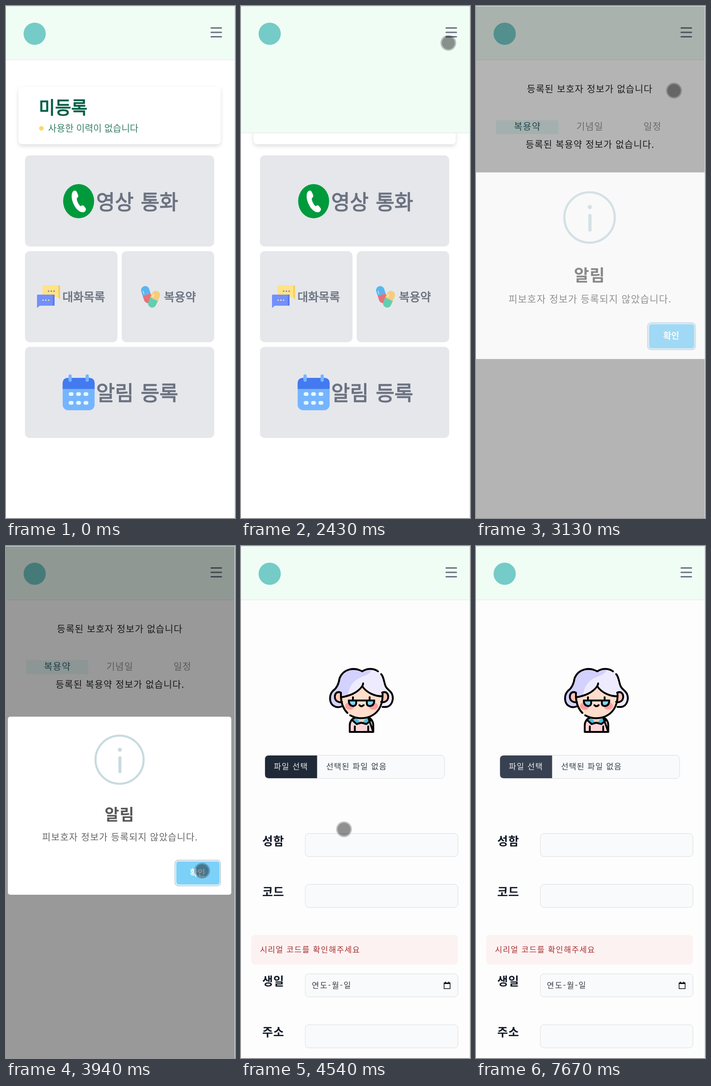
These frames come from a looping animation (495 px wide and 1107 px high, 8 s). An HTML page:

```html
<!DOCTYPE html>
<html lang="ko">
<head>
<meta charset="utf-8">
<title>보호 정보 등록</title>
<style>
html, body { margin: 0; width: 100%; height: 100%; overflow: hidden; background: #fff; }
svg { display: block; width: 495px; height: 1107px; }
text { font-family: "Noto Sans CJK KR", "Noto Sans CJK", "Noto Sans", sans-serif; white-space: pre; }
.tile { fill: #e5e7eb; }
.medium { stroke-linejoin: round; stroke-width: 1.3px; }
.big { font-size: 44px; fill: #6b7280; stroke: #6b7280; word-spacing: 3px; }
.small { font-size: 25px; fill: #6b7280; stroke: #6b7280; stroke-width: .8px; }
.info { font-size: 20px; font-weight: 300; letter-spacing: 1px; text-anchor: middle; fill-opacity: .85; }
.label { font-size: 25px; font-weight: 700; fill: #111827; letter-spacing: .8px; }
.field { font-size: 17px; font-weight: 300; letter-spacing: 1.4px; fill: #1f2937; fill-opacity: .9; }
.input { fill: #f9fafb; stroke: #d9dcdf; }
.ink { fill: none; stroke: #000; stroke-width: 4; stroke-linecap: round; stroke-linejoin: round; }
.card { filter: drop-shadow(0 4px 4px rgba(0,0,0,.13)); }
</style>
</head>
<body>
<svg viewBox="0 0 495 1107" xmlns="http://www.w3.org/2000/svg">
  <rect width="495" height="1107" fill="#fff"/>

  <g id="home">
    <rect class="card" x="27" y="175" width="437" height="124" rx="8" fill="#fff"/>
    <text class="medium" x="71" y="233" font-size="38" fill="#065f46" stroke="#065f46">미등록</text>
    <circle cx="76.500" cy="264.500" r="5" fill="#fcd96a"/>
    <text x="91" y="272" font-size="20" font-weight="300" fill="#065f46" fill-opacity=".8">사용한 이력이 없습니다</text>

    <rect class="tile" x="41" y="323" width="409" height="197" rx="10"/>
    <rect class="tile" x="41" y="530" width="200" height="197" rx="10"/>
    <rect class="tile" x="250" y="530" width="200" height="197" rx="10"/>
    <rect class="tile" x="41" y="737" width="409" height="197" rx="10"/>

    <ellipse cx="157" cy="422" rx="33.500" ry="37" fill="#009a3d"/>
    <path fill="#fff" d="M144 402C147 398 151 398 153 402L156 409C157 412 155 414 153 416C153 422 157 429 161 433C164 431 166 430 168 432L172 437C174 440 172 444 168 446C160 447 152 440 147 430C142 420 140 409 144 402Z"/>
    <text class="medium big" x="195" y="440">영상 통화</text>

    <path fill="#ffe386" d="M81 604H115Q117 604 117 606V634L111 629H79V606Q79 604 81 604Z"/>
    <path fill="#f6cf62" d="M113 604H115Q117 604 117 606V634L113 630Z"/>
    <path fill="#7390fa" d="M69 624H103Q105 624 105 626V646Q105 648 103 648H73L67 653V626Q67 624 69 624Z"/>
    <path fill="#5a7af0" d="M101 624H103Q105 624 105 626V646Q105 648 103 648H101Z"/>
    <g fill="#6b6ccb"><circle cx="92" cy="616.500" r="1.500"/><circle cx="98" cy="616.500" r="1.500"/><circle cx="104" cy="616.500" r="1.500"/></g>
    <g fill="#ffe9c0"><circle cx="80" cy="636" r="1.500"/><circle cx="86" cy="636" r="1.500"/><circle cx="92" cy="636" r="1.500"/></g>
    <text class="small" x="122" y="638">대화목록</text>

    <g transform="translate(304 624) rotate(-18)">
      <path fill="#5ab5ee" d="M-9 0V-10A9 9 0 0 1 9 -10V0Z"/>
      <path fill="#e5737b" d="M-9 0V10A9 9 0 0 0 9 10V0Z"/>
      <path fill="none" stroke="#b5e0fa" stroke-width="2" d="M-5 -3V-10"/>
    </g>
    <g transform="translate(320 634) rotate(24)">
      <path fill="#f6cd7b" d="M-9 0V-10A9 9 0 0 1 9 -10V0Z"/>
      <path fill="#62ceb0" d="M-9 0V10A9 9 0 0 0 9 10V0Z"/>
      <path fill="none" stroke="#fff0c8" stroke-width="2" d="M-5 -3V-10"/>
    </g>
    <text class="small" x="341.500" y="638">복용약</text>

    <rect x="122.500" y="804" width="69" height="70" rx="12" fill="#75b5ff"/>
    <path fill="#447af0" d="M122.500 828V816Q122.500 804 134.500 804H179.500Q191.500 804 191.500 816V828Z"/>
    <path stroke="#75b5ff" stroke-width="7" stroke-linecap="round" d="M138.500 800V809M175.500 800V809"/>
    <path stroke="#e8f6fd" stroke-width="8" stroke-linecap="round" d="M139.500 839H142M155.500 839H158M171.500 839H174M139.500 858H142M155.500 858H158M171.500 858H174"/>
    <text class="medium big" x="195" y="853">알림 등록</text>
  </g>

  <g id="guard">
    <text class="info" x="246" y="187">등록된 보호자 정보가 없습니다</text>
    <rect x="43" y="247" width="135" height="30" fill="#e9faf7"/>
    <text class="info" x="111" y="268" fill="#134e5a">복용약</text>
    <text class="info" x="246" y="268" fill="#848484">기념일</text>
    <text class="info" x="381.500" y="268" fill="#848484">일정</text>
    <text class="info" x="246.500" y="307">등록된 복용약 정보가 없습니다.</text>
  </g>

  <g id="form">
    <rect y="117" width="494" height="990" fill="#fdfdfd"/>
    <path fill="#fdd5d8" d="M235 402V388C235 380 240 373 247 371H275C282 373 286 380 286 388V402Z"/>
    <path fill="#45bfdc" d="M240 377L250 386L260 384L271 386L282 377L274 370H247Z"/>
    <path fill="#ffcdbd" d="M249 371H272L260 384Z"/>
    <path class="ink" d="M235 402V388C235 380 240 373 247 371M275 371C282 373 286 380 286 388V402ZM235 402H286M246 390V401M275 390V401M241 377L250 385L260 382L271 385L281 377"/>
    <path fill="#efebff" d="M262 271C274 263 288 265 297 271C309 281 309 296 313 304C316 310 322 312 326 319C331 330 327 346 314 348H217C212 349 206 349 201 346C190 340 190 322 199 313C206 308 211 300 213 286C222 264 246 262 262 271Z"/>
    <path fill="#d3d1fd" d="M282 267C278 288 238 274 231 324L217 347C212 349 206 349 201 346C190 340 190 322 199 313C206 308 211 300 213 286C222 264 246 262 262 271Q272 265 282 267Z"/>
    <path fill="#ffc4b5" d="M216 317C206 313 202 321 203 328C204 336 212 339 218 337ZM305 317C315 313 319 321 318 328C317 336 309 339 303 337Z"/>
    <path fill="#ffdccb" d="M216 327C232 325 252 318 262 303C272 318 290 325 306 325C306 352 286 373 261 373C236 373 216 352 216 327Z"/>
    <ellipse cx="235" cy="346" rx="10" ry="8" fill="#ff9f9d"/>
    <ellipse cx="286" cy="346" rx="10" ry="8" fill="#ff9f9d"/>
    <path class="ink" d="M262 271C246 262 222 264 213 286C211 300 206 308 199 313C190 322 190 340 201 346C206 349 212 349 217 347M262 271C274 263 288 265 296 271M303 277C309 283 309 296 313 304C316 310 322 312 326 319C331 330 327 346 314 348H306"/>
    <path class="ink" d="M216 317C206 313 202 321 203 328C204 336 212 339 218 337M305 317C315 313 319 321 318 328C317 336 309 339 303 337"/>
    <path class="ink" d="M216 318V327C217 342 222 353 230 361M236 366C262 381 305 370 306 325V318M216 327C232 325 252 318 262 303Q264 300 264 297M262 303C272 318 290 325 306 325"/>
    <path class="ink" style="fill:#7fd6fa" d="M233 334H249V340Q248 346 242 346Q233 345 233 334ZM272 334H288Q288 345 279 346Q272 346 272 340Z"/>
    <path class="ink" d="M233 334H288M242 327V331M278 327V331M256 344Q260 349 265 344"/>

    <rect class="input" x="51.500" y="452.500" width="388.500" height="50" rx="8"/>
    <path id="pick" d="M164.500 453V502H60Q52 502 52 494V461Q52 453 60 453Z"/>
    <text class="field" x="71" y="483" style="fill:#fff">파일 선택</text>
    <text class="field" x="184" y="483">선택된 파일 없음</text>

    <text class="label" x="46" y="647">성함</text>
    <text class="label" x="46" y="757">코드</text>
    <text class="label" x="46" y="950">생일</text>
    <text class="label" x="46" y="1060">주소</text>
    <rect class="input" x="139" y="621.500" width="330" height="50" rx="8"/>
    <rect class="input" x="139" y="731.500" width="330" height="50" rx="8"/>
    <rect class="input" x="139" y="925" width="330" height="50" rx="8"/>
    <rect class="input" x="139" y="1035" width="330" height="50" rx="8"/>
    <rect x="22" y="841" width="447" height="64" rx="8" fill="#fdf2f2"/>
    <text class="field" x="41" y="879" style="fill:#9b1c1c">시리얼 코드를 확인해주세요</text>
    <text class="field" x="153" y="956" style="letter-spacing:2px">연도-월-일</text>
    <path fill="none" stroke="#111" stroke-width="1.500" d="M439 944.500H452V957H439Z"/>
    <path stroke="#111" stroke-width="3" d="M439 945.500H452"/>
    <path stroke="#111" stroke-width="2" d="M442 942V945M449 942V945"/>
  </g>

  <g>
    <rect id="head" width="494" height="116" fill="#f0fdf5"/>
    <rect id="rule" y="116" width="494" height="1" fill="#e1e8e6"/>
    <circle cx="62" cy="60" r="24" fill="#74cbc8"/>
    <path stroke="#6b7280" stroke-width="3" stroke-linecap="round" d="M443.500 47.500H465.500M443.500 57H465.500M443.500 66.500H465.500"/>
  </g>

  <g id="alert">
    <rect y="1" width="494" height="1106" opacity=".4"/>
    <g id="box">
      <rect x="4" y="369" width="483" height="385" rx="5" fill="#fff"/>
      <circle cx="245.500" cy="462" r="52" fill="none" stroke="#c9dae1" stroke-width="4.500"/>
      <circle cx="246" cy="440.500" r="4.300" fill="#c9dae1"/>
      <rect x="243" y="455" width="6.500" height="36" rx="2" fill="#c9dae1"/>
      <text x="245.500" y="593" font-size="34" font-weight="700" fill="#595959" text-anchor="middle" letter-spacing="1">알림</text>
      <text class="info" x="246.500" y="637" fill="#4c4c4c">피보호자 정보가 등록되지 않았습니다.</text>
      <rect x="365.500" y="679.500" width="98" height="55" rx="7" fill="#fff" stroke="#c3d6e4" stroke-width="2.500"/>
      <rect x="368" y="682" width="93.500" height="50" rx="5" fill="#7cd1f9"/>
      <text x="414" y="712.500" font-size="18" font-weight="700" fill="#fff" text-anchor="middle">확인</text>
    </g>
  </g>

  <path fill="#d9dfe1" d="M0 0H495V1H0ZM494 1H495V1107H494Z"/>
  <g id="touch"><circle r="17" fill-opacity=".24"/><circle r="14" fill-opacity=".25"/></g>
  <path id="arrow" fill="#fff" stroke="#000" d="M493.500 124.500V147.500L499 142L503 150L506 148L502 141H509Z"/>
</svg>
<script>
const LOOP = 8000;
const $ = id => document.getElementById(id);
const [home, guard, form, head, rule, pick, modal, box, touch, arrow] =
  ['home', 'guard', 'form', 'head', 'rule', 'pick', 'alert', 'box', 'touch', 'arrow'].map($);

const clamp = v => Math.max(0, Math.min(1, v));
const easeOut = p => 1 - (1 - clamp(p)) ** 2.2;
const smooth = p => p * p * (3 - 2 * p);
const linear = p => p;
const show = (el, on) => el.style.display = on ? '' : 'none';

// time, x, y, easing into the point
const path = [
  [1480, 484, 118, linear], [1900, 454, 50, smooth], [2290, 454, 50, linear],
  [2750, 428, 183, smooth], [3450, 428, 183, linear], [3920, 424, 702, smooth],
  [4340, 424, 702, linear], [4540, 223, 613, linear], [5100, 141, 480, easeOut]
];
// progress, scale, easing
const pop = [[0, .5, easeOut], [.45, 1.05, easeOut], [.8, .95, easeOut], [1, 1, easeOut]];

function at(keys, t, col) {
  const i = keys.findIndex(k => k[0] > t);
  if (i < 0) return keys[keys.length - 1][col];
  if (i === 0) return keys[0][col];
  const a = keys[i - 1], b = keys[i];
  const ease = b[b.length - 1];
  return a[col] + (b[col] - a[col]) * ease((t - a[0]) / (b[0] - a[0]));
}

function pointer(t) {
  if (t >= 70 && t < 140) return [490, 1102, 1];
  if (t >= 1480 && t < 5880) return [at(path, t, 1), at(path, t, 2), 1 - .3 * clamp((t - 5520) / 360)];
  if (t >= 6150 && t < 7610) return [121, 490, 1];
  return null;
}

function draw(t) {
  show(home, t < 2830);
  show(guard, t >= 2830 && t < 4080);
  show(form, t >= 4080);

  const bottom = t >= 2000 && t < 2830 ? 274 : 116;
  head.setAttribute('height', bottom);
  rule.setAttribute('y', bottom);

  const age = t - 2995;
  const fade = 1 - easeOut((t - 3945) / 265);
  show(modal, age > 0 && t < 4210);
  modal.setAttribute('opacity', easeOut(age / 300) * fade);
  box.setAttribute('opacity', easeOut(age / 200) * fade);
  box.setAttribute('transform',
    `translate(245.5 561.5) scale(${at(pop, age / 300, 1)}) translate(-245.5 -561.5)`);

  const p = pointer(t);
  show(touch, p);
  if (p) touch.setAttribute('transform', `translate(${p[0]} ${p[1]}) scale(${p[2]})`);
  show(arrow, t >= 1405 && t < 1480);
  pick.setAttribute('fill', t > 4700 ? '#374151' : '#1f2937');
}

const start = performance.now();
function tick() {
  draw((performance.now() - start) % LOOP);
  requestAnimationFrame(tick);
}
draw(0);
requestAnimationFrame(tick);
</script>
</body>
</html>
```
